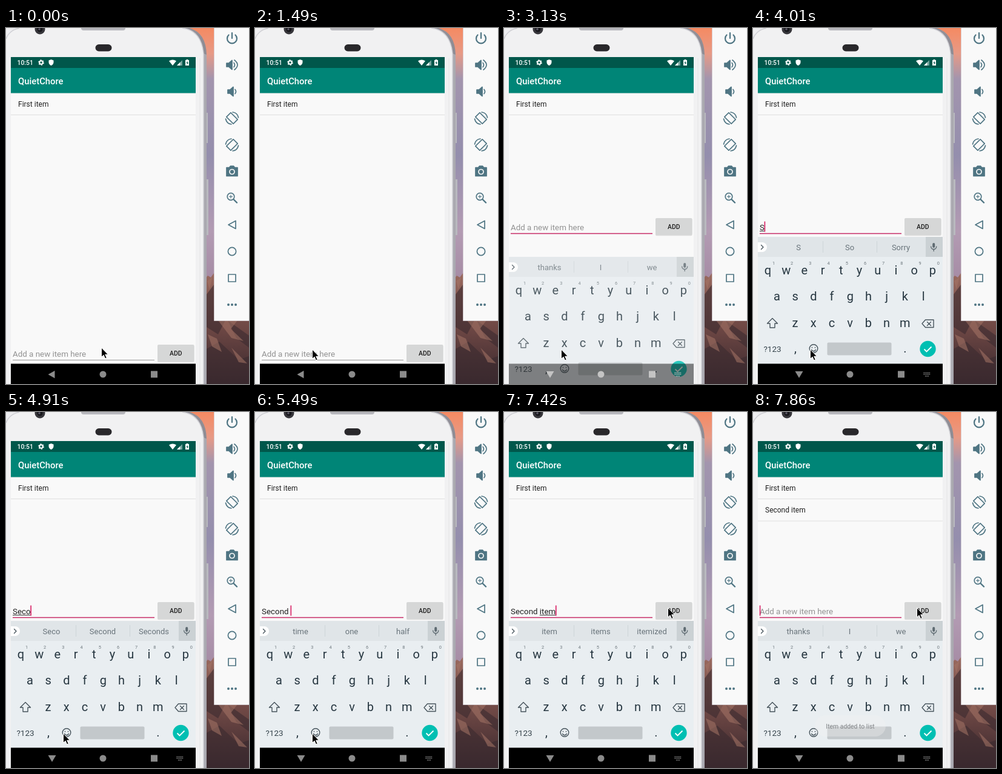
An HTML page that plays this animation: 401 by 588 pixels, repeating every 8 s.

```html
<!DOCTYPE html>
<html lang="en">
<head>
<meta charset="utf-8">
<title>To-do list demo</title>
<style>
html, body { margin: 0; width: 100%; height: 100%; overflow: hidden; background: #fff; }
svg { display: block; width: 100%; height: 100%; }
text { font-family: Roboto, sans-serif; white-space: pre; }
.mid { text-anchor: middle; }
.line { fill: none; stroke: #4f7583; stroke-width: 1.7; stroke-linejoin: round; stroke-linecap: round; }
.key { font-size: 20px; fill: #263640; text-anchor: middle; }
.num { font-size: 7.4px; fill: #6d777d; text-anchor: middle; }
.outline { fill: none; stroke: #47545c; stroke-width: 1.4; stroke-linejoin: round; stroke-linecap: round; }
</style>
</head>
<body>
<svg viewBox="0 0 401 588" preserveAspectRatio="none">
  <defs>
    <linearGradient id="sky" x2="0" y2="1">
      <stop offset="0" stop-color="#f58a62"/>
      <stop offset=".1" stop-color="#e79a86"/>
      <stop offset=".2" stop-color="#a395ae"/>
      <stop offset=".5" stop-color="#948ead"/>
      <stop offset=".8" stop-color="#b39bb3"/>
      <stop offset="1" stop-color="#a58ba4"/>
    </linearGradient>
    <linearGradient id="edge">
      <stop offset="0" stop-color="#efeff1"/>
      <stop offset=".5" stop-color="#c3c3c9"/>
      <stop offset="1" stop-color="#8d8b93"/>
    </linearGradient>
    <linearGradient id="rock" x2="0" y2="1">
      <stop offset="0" stop-color="#9a6a5f"/>
      <stop offset=".5" stop-color="#6d4744"/>
      <stop offset="1" stop-color="#38272d"/>
    </linearGradient>
    <clipPath id="screen"><rect x="8" y="48" width="305" height="540"/></clipPath>
  </defs>

  <!-- Wallpaper -->
  <rect width="401" height="420" fill="url(#sky)"/>
  <path d="M320 424L333 409 338 412 343 405 360 430H401V588H320Z" fill="url(#rock)"/>
  <path d="M331 440L343 424V458L362 483 350 506 331 494ZM366 483L401 508V528L380 512ZM331 530L352 518 384 548 401 542V588H331Z" fill="#3b2a30" opacity=".6"/>
  <path d="M332 418L340 412 336 432ZM350 483H382L371 497 392 517 372 512ZM333 506L348 513 356 535 340 526ZM372 528L398 554 384 552Z" fill="#a77566" opacity=".55"/>

  <!-- Phone body -->
  <path d="M330 140H333V190H330ZM330 250H334V342H330Z" fill="#b9b9bf"/>
  <path d="M0 0H303Q330 8 331 44V588H0Z" fill="url(#edge)"/>
  <path d="M325 42V588H331V44Z" fill="#aaa9b0"/>
  <path d="M0 18Q5 4 22 0H291Q322 4 326 42V588H0Z" fill="#f1f1f2"/>
  <path d="M0 18Q5 4 22 0M291 0Q322 4 326 42V588" fill="none" stroke="#d0d0d5" stroke-width="1.5"/>
  <path d="M320 50V588" stroke="#e3e3e6" stroke-width="1"/>
  <rect x="124" y="-4" width="73" height="8" rx="4" fill="#b8b8bd"/>
  <circle cx="56" cy="2" r="8.5" fill="#37363b"/>
  <circle cx="56" cy="2" r="4.5" fill="#17171b"/>
  <circle cx="55" cy="2" r="1.8" fill="#5c5868"/>
  <rect x="147.500" y="27" width="27" height="11.500" rx="5.700" fill="#29282b"/>

  <!-- App -->
  <g clip-path="url(#screen)">
    <rect x="8" y="48" width="305" height="540" fill="#f9f9f9"/>
    <rect x="8" y="107" width="305" height="4" fill="#eee"/>
    <rect x="8" y="108.500" width="305" height="4" fill="#f9f9f9"/>
    <rect x="8" y="48" width="305" height="18" fill="#00574b"/>
    <rect x="8" y="66" width="305" height="41.500" fill="#008577"/>
    <g fill="#fff">
      <text x="18.500" y="61" font-size="10.400" font-weight="500">10:51</text>
      <circle cx="58" cy="57" r="2.700" fill="none" stroke="#fff" stroke-width="2"/>
      <circle cx="58" cy="57" r="4" fill="none" stroke="#fff" stroke-width="1.600" stroke-dasharray="2.100 2.090"/>
      <path d="M74.500 52L78.500 53.500V57Q78 60.500 74.500 62 71 60.500 70.500 57V53.500Z"/>
      <path d="M269 54.500Q275 50.500 281 54.500L275 62Z"/>
      <path d="M282 62L291 53V62Z" opacity=".45"/>
      <path d="M282 62L287.500 56.500V62Z"/>
      <path d="M297.500 52H300.500V53H302V62H296V53H297.500Z"/>
      <path d="M299.500 54.500L297.500 58H299V60.500L301 57H299.500Z" fill="#00574b"/>
      <text x="20" y="92.500" font-size="14.840" font-weight="500">QuietChore</text>
    </g>
    <g font-size="12" fill="#212121">
      <text x="20" y="130">First item</text>
      <path d="M8 143.500H313" stroke="#e0e0e0"/>
      <g id="second">
        <text x="20" y="166">Second item</text>
        <path d="M8 180H313" stroke="#e0e0e0"/>
      </g>
    </g>
    <g id="field">
      <text id="hint" x="11" y="542.500" font-size="13.360" fill="#929292">Add a new item here</text>
      <text id="typed" x="11" y="542.500" font-size="13.360" fill="#212121"></text>
      <path id="compose" stroke="#333" stroke-width="1"/>
      <path id="rule"/>
      <rect id="caret" y="528.500" width="1.600" height="17" fill="#d81b60"/>
      <rect x="250" y="523.700" width="60.500" height="28.500" rx="2" fill="#bbb" opacity=".45"/>
      <rect id="button" x="250" y="523" width="60.500" height="28" rx="2"/>
      <text class="mid" x="280.300" y="541" font-size="10.400" font-weight="500" fill="#1d1d1d">ADD</text>
    </g>

    <g id="keyboard">
      <rect x="8" y="345" width="305" height="243" fill="#e9eef1"/>
      <rect x="8" y="345" width="305" height="33" fill="#e0e5e8"/>
      <rect x="285" y="345" width="28" height="33" fill="#cbd1d4"/>
      <path d="M115.500 352V371M204.500 352V371" stroke="#ced4d7"/>
      <path d="M8 354H15A8 8 0 0 1 15 370H8Z" fill="#fff"/>
      <path d="M13.500 358.500L17 362 13.500 365.500" class="outline"/>
      <g id="words" class="mid" font-size="13" fill="#69747b">
        <text x="75" y="367"></text><text x="159.500" y="367"></text><text x="244" y="367"></text>
      </g>
      <rect x="296.200" y="355" width="4" height="8" rx="2" fill="#5e6a71"/>
      <path d="M293.700 361A4.500 4.500 0 0 0 302.700 361M298.200 366V368.500" class="outline" style="stroke:#5e6a71"/>
      <g id="keys"></g>
      <path d="M32 479.500L40.500 488H36V495H28V488H23.500Z" class="outline"/>
      <path d="M284.500 482H298V494.500H284.500L279 488.200ZM287.500 485.500L293.500 491.500M293.500 485.500L287.500 491.500" class="outline"/>
      <text class="mid" x="32" y="535" font-size="13.500" fill="#35434b">?123</text>
      <text class="key" x="70" y="536">,</text>
      <text class="key" x="251" y="536">.</text>
      <circle cx="100" cy="529.500" r="6.800" class="outline"/>
      <path d="M97.500 527.500V528M102.500 527.500V528M96.500 531.500Q100 536 103.500 531.500" class="outline"/>
      <rect x="122.500" y="519.500" width="106" height="21" rx="2" fill="#c3c8cb"/>
      <circle cx="288.500" cy="530" r="13.200" fill="#00bfb2"/>
      <path d="M282.500 530.500L286.500 534.500 294.500 526.500" fill="none" stroke="#fff" stroke-width="1.800"/>
    </g>

    <g id="toast" opacity=".34">
      <rect x="102" y="501" width="117" height="35" rx="17.500" fill="#f1f1f1"/>
    </g>
    <text id="note" class="mid" x="160.500" y="522.500" font-size="10.400" fill="#838689">Item added to list</text>

    <rect id="nav" x="8" y="554.500" width="305" height="34"/>
    <g id="navIcons">
      <path id="back"/>
      <circle cx="160" cy="572" r="5.500"/>
      <rect x="239" y="566.500" width="11" height="11"/>
      <path id="switcher" d="M281.500 569.500H293M281.500 572H293M284 575H290.500" fill="none" stroke-width="1.500" stroke-dasharray="1.400 .9"/>
    </g>
  </g>

  <!-- Side toolbar -->
  <rect x="343.500" width="58" height="483.500" fill="#f9f9f9"/>
  <path d="M343.500 0V483.500H401" fill="none" stroke="#d8d4d8" stroke-width=".8"/>
  <g class="line">
    <path d="M373 8V17M367.500 11.500A8 8 0 1 0 378.500 11.500" stroke-width="2.200"/>
    <g id="speaker"><path d="M364 58H368L373 53.500V68.500L368 64H364Z" fill="#4f7583"/><path d="M376 57.500Q379 61 376 64.500"/></g>
    <path d="M377 53Q387 61 377 69"/>
    <use href="#speaker" x="2" y="44"/>
    <g id="rotate">
      <rect x="368" y="141" width="10" height="16" transform="rotate(-45 373 149)"/>
      <path d="M374 139Q382 140 383.500 148M372 159Q364 158 362.500 150"/>
    </g>
    <use href="#rotate" transform="matrix(-1 0 0 1 746 44)"/>
    <path d="M364 230.500H368.500L370.500 228H375.500L377.500 230.500H382V244.500H364Z" fill="#4f7583"/>
    <circle cx="373" cy="237.500" r="4" stroke="#f9f9f9"/>
    <circle cx="371" cy="278.500" r="5.800"/>
    <path d="M375.500 283L381 288.500" stroke-width="2.400"/>
    <path d="M368.500 278.500H373.500M371 276V281" stroke-width="1.200"/>
    <path d="M379 318.500V331.500L367 325Z"/>
    <circle cx="373" cy="369" r="6.600"/>
    <rect x="367" y="407" width="12" height="12"/>
    <path d="M367 457H367.010M373 457H373.010M379 457H379.010" stroke-width="4"/>
  </g>

  <path id="mouse" d="M0 0V15.500L3.600 12.200 6.200 18 8.700 16.900 6.200 11.300H11Z" fill="#000" stroke="#fff" stroke-width="1" stroke-linejoin="round"/>
</svg>
<script>
const LOOP = 8000;
const $ = id => document.getElementById(id);
const set = (id, attrs) => {
  for (const name in attrs) $(id).setAttribute(name, attrs[name]);
};
const show = (id, on) => { $(id).style.display = on ? "" : "none"; };
const latest = (steps, t) => steps.filter(s => s[0] <= t).pop();

// Start time, committed text, word being composed, suggestions
const typing = [
  [0, "", "", "thanks I we"],
  [4010, "", "S", "S So Sorry"],
  [4460, "", "Se", "Se See Send"],
  [4610, "", "Sec", "Sec Second Secs"],
  [4910, "", "Seco", "Seco Second Seconds"],
  [5060, "", "Secon", "Secon Second Seconds"],
  [5200, "", "Second", "Second Seconds Secondly"],
  [5350, "Second ", "", "Second Seconds Secondly"],
  [5490, "Second ", "", "time one half"],
  [5940, "Second ", "i", "i I in"],
  [6090, "Second ", "it", "it its it's"],
  [6240, "Second ", "ite", "ite item items"],
  [6390, "Second ", "item", "item items itemized"],
  [7710, "", "", "item items itemized"],
  [7860, "", "", "thanks I we"]
];

// Start time and pointer tip
const pointer = [
  [0, 157.5, 528], [1040, 150, 537], [1190, 124, 540], [1340, 101, 534], [1490, 94.500, 531],
  [6690, 94.500, 530], [6840, 112, 509], [6980, 159, 452], [7130, 216, 385],
  [7280, 257, 338], [7420, 270.500, 323.500]
];

// Start time, drop below resting place, opacity
const slide = [[0, 0, 0], [2980, 92, .4], [3130, 33, .82], [3270, 0, 1]];

const pen = document.createElement("canvas").getContext("2d");
const width = s => {
  pen.font = "13.36px Roboto, sans-serif";
  return pen.measureText(s).width;
};

function buildKeys() {
  const rows = [["qwertyuiop", 24.5, 407], ["asdfghjkl", 39.5, 449.5], ["zxcvbnm", 69.5, 493.5]];
  $("keys").innerHTML = rows.map(([letters, x0, y], r) =>
    [...letters].map((c, i) => {
      const x = x0 + i * 30.2;
      const digit = r ? "" : `<text class="num" x="${x + 9.5}" y="391">${(i + 1) % 10}</text>`;
      return `<text class="key" x="${x}" y="${y}">${c}</text>${digit}`;
    }).join("")).join("");
}

function render(t) {
  const focused = t >= 2540, open = t >= 2980, settled = t >= 3270;
  const [, done, word, words] = latest(typing, t);
  const [, x, y] = latest(pointer, t);
  const [, drop, alpha] = latest(slide, t);
  const text = done + word;
  const start = 11 + width(done), end = 11 + width(text);

  set("mouse", { transform: `translate(${x} ${y})` });
  set("field", { transform: `translate(0 ${open ? -209 : 0})` });
  set("rule", focused
    ? { d: "M11 548.500H245", stroke: "#c62a66", "stroke-width": 1.6 }
    : { d: "M11 548.500H245", stroke: "#999", "stroke-width": 1 });
  set("caret", { x: text ? end - .3 : 10.8 });
  set("compose", { d: `M${start} 544.500H${end}` });
  set("button", { fill: t >= 7560 && t < 7860 ? "#c6c7c7" : "#d6d7d7" });
  $("typed").textContent = text;

  show("hint", !text);
  show("compose", word);
  show("caret", (t >= 2690 && t < 2980) || (t >= 3270 && t < 3570) || t >= 4010);
  show("second", t >= 7710);
  show("toast", t >= 7860);
  show("note", t >= 7860);

  show("keyboard", open);
  set("keyboard", { transform: `translate(0 ${drop})`, opacity: alpha });
  words.split(" ").forEach((w, i) => { $("words").children[i].textContent = w; });

  const sliding = open && !settled;
  const gray = sliding ? "#c4c4c4" : "#8b8b8b";
  set("nav", { "fill-opacity": sliding ? .47 : 1 });
  set("navIcons", { fill: gray, stroke: "none" });
  set("switcher", { stroke: gray });
  set("back", { d: open ? "M69.500 567H82.500L76 578Z" : "M80.500 566V578.500L69.500 572.200Z" });
  show("switcher", open);
}

buildKeys();
const origin = performance.now();
(function tick() {
  render((performance.now() - origin) % LOOP);
  requestAnimationFrame(tick);
})();
</script>
</body>
</html>
```
